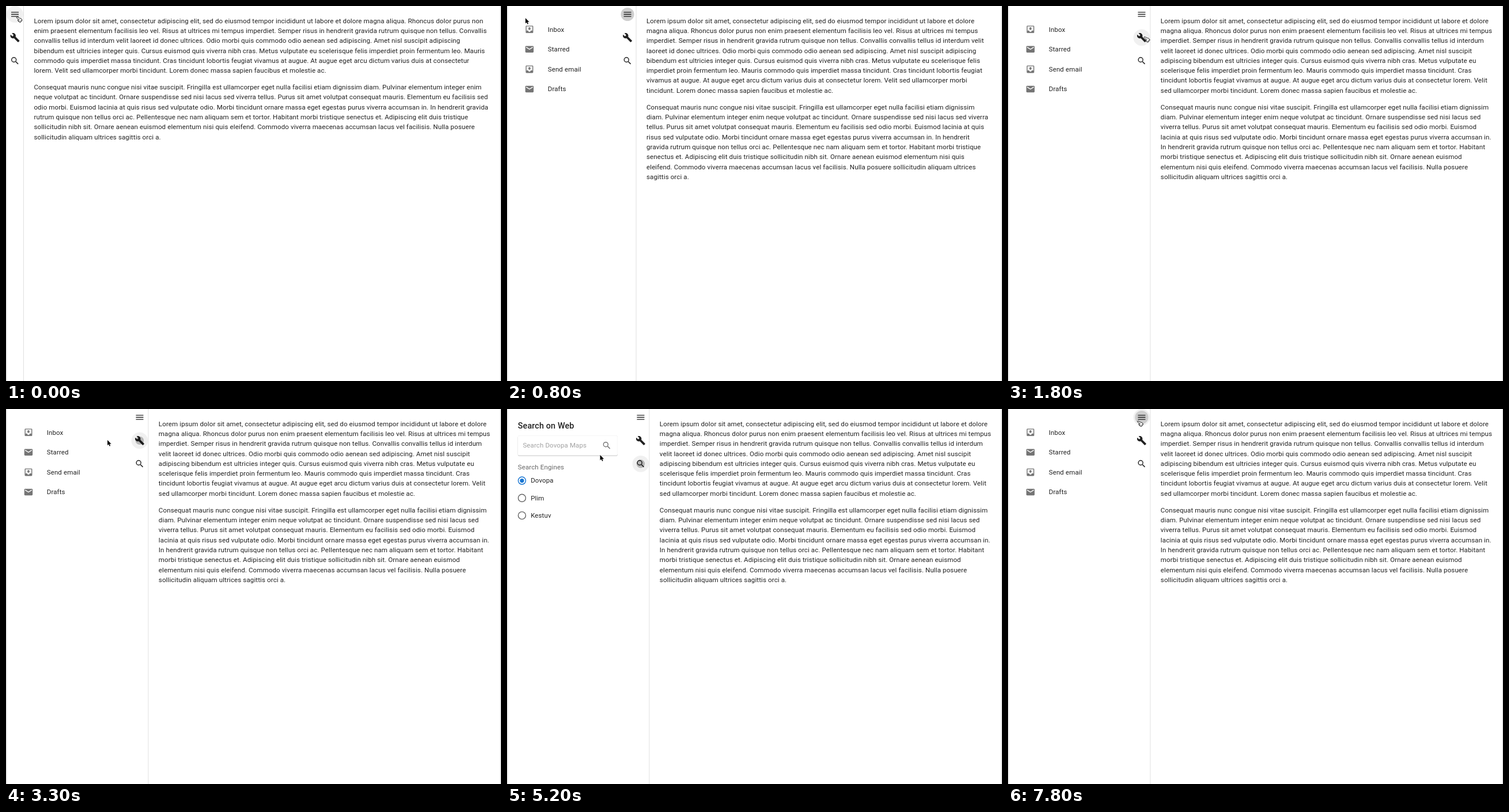
An HTML page that plays this animation: 859 px wide and 652 px high, repeating every 8 s.

```html
<!DOCTYPE html>
<html lang="en">
<head>
<meta charset="utf-8">
<title>Collapsible sidebar</title>
<style>
  html, body { margin: 0; width: 100%; height: 100%; overflow: hidden; background: #fff; }
  #page { position: absolute; left: 0; top: 0; transform: scale(.7215); transform-origin: 0 0; }
  #main { position: absolute; top: 24.4px; }
  p { margin: 0 0 16px; }
  p, text { font: 16px/24px Roboto, sans-serif; letter-spacing: .00938em; color: rgba(0,0,0,.87); }
  svg { position: absolute; left: 0; top: 0; }
  text.title { font-size: 20px; font-weight: 500; letter-spacing: .0075em; }
  .raised { filter: drop-shadow(0 1px 1px rgba(0,0,0,.25)) drop-shadow(0 0 1px rgba(0,0,0,.14)); }
</style>
</head>
<body>
<div id="page"><div id="main">
<p>Lorem ipsum dolor sit amet, consectetur adipiscing elit, sed do eiusmod tempor incididunt ut labore et dolore magna aliqua. Rhoncus dolor purus non enim praesent elementum facilisis leo vel. Risus at ultrices mi tempus imperdiet. Semper risus in hendrerit gravida rutrum quisque non tellus. Convallis convallis tellus id interdum velit laoreet id donec ultrices. Odio morbi quis commodo odio aenean sed adipiscing. Amet nisl suscipit adipiscing bibendum est ultricies integer quis. Cursus euismod quis viverra nibh cras. Metus vulputate eu scelerisque felis imperdiet proin fermentum leo. Mauris commodo quis imperdiet massa tincidunt. Cras tincidunt lobortis feugiat vivamus at augue. At augue eget arcu dictum varius duis at consectetur lorem.&nbsp;Velit sed ullamcorper morbi tincidunt. Lorem donec massa sapien faucibus et molestie ac.</p>
<p>Consequat mauris nunc congue nisi vitae suscipit. Fringilla est ullamcorper eget nulla facilisi etiam dignissim diam. Pulvinar elementum integer enim neque volutpat ac tincidunt. Ornare suspendisse sed nisi lacus sed viverra tellus. Purus sit amet volutpat consequat mauris. Elementum eu facilisis sed odio morbi. Euismod lacinia at quis risus sed vulputate odio. Morbi tincidunt ornare massa eget egestas purus viverra accumsan in. In hendrerit gravida rutrum quisque non tellus orci ac. Pellentesque nec nam aliquam sem et tortor. Habitant morbi tristique senectus et. Adipiscing elit duis tristique sollicitudin nibh sit. Ornare aenean euismod elementum nisi quis eleifend.&nbsp;Commodo viverra maecenas accumsan lacus vel facilisis. Nulla posuere sollicitudin aliquam ultrices sagittis orci a.</p>
</div></div>
<svg id="ui" width="859" height="652"></svg>
<script>
const LOOP = 8000, STEP = 100, SCALE = .7215, DRAWER = 300;
const INK = 'rgba(0,0,0,.87)', GREY = 'rgba(0,0,0,.6)', ICON = 'rgba(0,0,0,.54)', BLUE = '#1976d2';
const main = document.getElementById('main'), ui = document.getElementById('ui');

const ramp = (t, start, length) => Math.min(1, Math.max(0, (t - start) / length));
const ease = f => f * (2 - f);
const mix = (a, b, f) => a + (b - a) * f;

const icons = {
  menu: '<path d="M3 7h18M3 12h18M3 17h18" stroke-width="2"/>',
  search: '<circle cx="9.5" cy="9.5" r="5.5" fill="none" stroke-width="2"/><path d="M14 14l5.7 5.7" stroke-width="2.2"/>',
  wrench: '<path stroke="none" d="m22.7 19-9.1-9.1c.9-2.3.4-5-1.5-6.9-2-2-5-2.4-7.4-1.3L9 6 6 9 1.6 4.7C.4 7.1.9 10.1 2.9 12.1c1.9 1.9 4.6 2.4 6.9 1.5l9.1 9.1c.4.4 1 .4 1.4 0l2.3-2.3c.5-.4.5-1.1.1-1.4z"/>',
  inbox: '<rect x="4" y="4" width="16" height="16" rx="1" fill="none" stroke-width="2"/><path stroke="none" d="M5 15h4a3 3 0 0 0 6 0h4v4H5zM10 7h4v3h2l-4 4-4-4h2z"/>',
  mail: '<rect x="2" y="4" width="20" height="16" rx="2" stroke="none"/><path d="M4 7l8 5 8-5" fill="none" stroke="#fff" stroke-width="2"/>'
};

// Pointer moves: start, end, x, y in screen pixels.
const moves = [
  [600, 800, 32, 21], [800, 1500, 206, 50], [1500, 1800, 235.5, 53],
  [3200, 3800, 41, 56], [4100, 4200, 41, 83], [4400, 5000, 241, 96],
  [5100, 5400, 98, 67], [5500, 6000, 32, 154], [6100, 6300, 31, 183],
  [6400, 6600, 112, 150], [6600, 7100, 232.5, 14.5], [7700, 7800, 224, 20.5]
];
const buttons = [
  { icon: 'menu', presses: [700, 7600] },
  { icon: 'wrench', presses: [3300] },
  { icon: 'search', presses: [5200] }
];
const flips = [-LOOP, 3900, 4400];
const picks = [-LOOP, 5850, 6450, Infinity];

// Page coordinates of repeated parts.
const shiftAt = t => DRAWER * ease(ramp(t, 638, 240));
const barX = t => 21.5 + shiftAt(t);
const buttonY = i => 20.1 + 56 * i;
const switchY = i => 43 + 38 * i;
const radioY = i => 172.6 + 42 * i;

// Pointer position in page coordinates.
function pointer(t) {
  let p = [17.5, 18.5];
  for (const [start, end, ...to] of moves) {
    const f = ease(ramp(t, start, end - start));
    p = p.map((v, i) => mix(v, to[i], f));
  }
  return p.map(v => v / SCALE);
}
const overButton = (t, i) => {
  const [x, y] = pointer(t);
  return Math.hypot(x - barX(t), y - buttonY(i)) < 20;
};
const overRow = (t, rowY) => {
  const [x, y] = pointer(t);
  return x < 110 && Math.abs(y - rowY) < 19;
};

const icon = (name, x, y, color) =>
  `<g transform="translate(${x - 12} ${y - 12})" fill="${color}" stroke="${color}">${icons[name]}</g>`;
const label = (str, x, y, fill = INK, cls = '') =>
  `<text class="${cls}" x="${x}" y="${y + (cls ? 6.9 : 5.5)}" fill="${fill}">${str}</text>`;
const disc = (x, y, r, fill, extra = '') =>
  `<circle cx="${x}" cy="${y}" r="${r}" fill="${fill}" ${extra}/>`;
const box = (x, y, w, h, fill, extra = '') =>
  `<rect x="${x}" y="${y}" width="${w}" height="${h}" fill="${fill}" ${extra}/>`;
const halo = (shown, x, y) => shown ? disc(x, y, 19, 'rgba(0,0,0,.04)') : '';

function listPanel() {
  return ['Inbox', 'Starred', 'Send email', 'Drafts'].map((name, i) => {
    const y = 56.3 + 48 * i;
    return icon(i % 2 ? 'mail' : 'inbox', 54, y, ICON) + label(name, 98, y);
  }).join('');
}

function switchPanel(t) {
  return ['Switch', 'Switch 2', 'Switch 3'].map((name, i) => {
    const y = switchY(i), on = ramp(t, flips[i], 150), x = 34.4 + 20 * on, lit = on > .3;
    return box(27.2, y - 7, 34, 14, lit ? BLUE : '#000', `rx="7" opacity="${lit ? .5 : .38}"`) +
      halo(overRow(t, y), x, y) +
      disc(x, y, 10, lit ? BLUE : '#fff', 'class="raised"') + label(name, 73, y);
  }).join('');
}

function searchPanel(t) {
  const focused = t > picks[1] && t < 7500;
  const radios = ['Dovopa', 'Plim', 'Kestuv'].map((name, i) => {
    const y = radioY(i), color = t >= picks[i] && t < picks[i + 1] ? BLUE : GREY;
    const dot = ease(ramp(t, picks[i], 200)) - ramp(t, picks[i + 1], 200);
    return halo(overRow(t, y), 36, y) +
      disc(36, y, 9, 'none', `stroke="${color}" stroke-width="2"`) +
      disc(36, y, 5 * dot, color) + label(name, 57, y);
  }).join('');
  return label('Search on Web', 26, 40.6, INK, 'title') +
    box(26, 64, 240, 48, '#fff', 'rx="4" class="raised"') +
    label('Search Dovopa Maps', 38, 88, 'rgba(0,0,0,.37)') + icon('search', 240, 88, ICON) +
    label('Search Engines', 26, 140.3, focused ? BLUE : GREY) + radios;
}

function panel(t) {
  if (t >= 3400 && t < 5200) return switchPanel(t);
  return t >= 5200 && t < 7800 ? searchPanel(t) : listPanel();
}

function toolbar(t) {
  const x = barX(t);
  return buttons.map((b, i) => {
    const y = buttonY(i);
    const hovered = overButton(t, i) || overButton(t - STEP, i);
    const ripples = b.presses.filter(p => t >= p && t < p + 500).map(p =>
      disc(x, y, Math.min(16, 10 + (t - p) * .06), '#000', `opacity="${.24 * (1 - (t - p) / 500)}"`));
    return (hovered ? disc(x, y, 20, 'rgba(0,0,0,.06)') : '') + ripples.join('') + icon(b.icon, x, y, INK);
  }).join('');
}

function cursor(t) {
  const [x, y] = pointer(t).map(v => v * SCALE);
  const rowYs = t >= 5200 ? picks.slice(1).map((_, i) => radioY(i)) : flips.map((_, i) => switchY(i));
  const onRow = t >= 3400 && t < 7800 && rowYs.some(rowY => overRow(t, rowY));
  const hand = onRow || buttons.some((_, i) => overButton(t, i));
  const shape = hand
    ? `<path fill="#fff" stroke="#111" stroke-width=".9" stroke-linejoin="round"
        d="M.6 1.2Q.8.2 2 .6L6.2 2.6 8.6 3.2 10.8 6 7.6 10 5.2 9.2 3.4 7.6 3 5.8 4 4.6 1.2 2.4Z"/>
       <path stroke="#111" stroke-width=".7" d="M4 4.6l2 .8M3.2 6.2l2.4.6M4 7.8l1.8.4M10 5L7 9"/>`
    : `<path stroke="#fff" stroke-width=".8" paint-order="stroke"
        d="M0 0V9.3L2.1 7.4 3.6 10.8 5.1 10.1 3.7 6.8H6.6Z"/>`;
  return `<g transform="translate(${x} ${y})">${shape}</g>`;
}

function draw(t) {
  const shift = shiftAt(t);
  main.style.left = 67.1 + shift + 'px';
  main.style.width = 1099.2 - shift + 'px';
  ui.innerHTML =
    `<clipPath id="drawer">${box(2, 0, shift, 906, '#000')}</clipPath>
    <g transform="scale(${SCALE})">
      <g clip-path="url(#drawer)">${panel(t)}</g>
      ${toolbar(t)}
    </g>` +
    box(30 + shift * SCALE, 0, 1, 652, '#e0e0e0') +
    box(0, 0, 1.5, 652, '#dcdcdc') + box(857.5, 0, 1.5, 652, '#dcdcdc') + cursor(t);
}

let last = -1;
function tick() {
  const t = Math.floor(performance.now() % LOOP / STEP) * STEP;
  if (t !== last) draw(last = t);
  requestAnimationFrame(tick);
}
tick();
</script>
</body>
</html>
```
